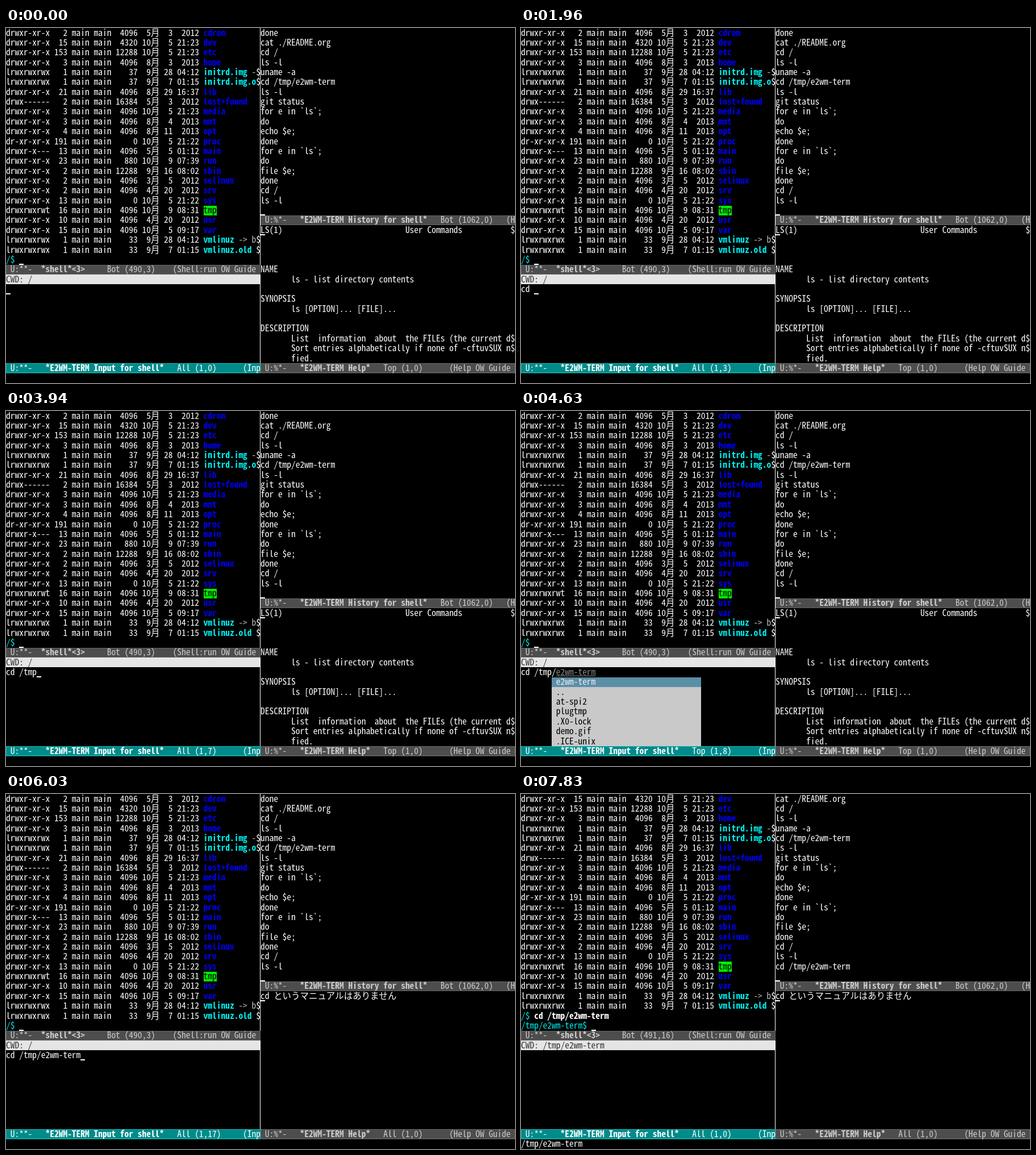
An HTML page with a canvas that plays this animation: 896 by 625 pixels, repeating every 8000 ms.

```html
<!DOCTYPE html>
<html lang="en">
<head>
<meta charset="utf-8">
<title>Shell windows</title>
<style>
html, body { margin: 0; width: 100%; height: 100%; overflow: hidden; background: #000; }
canvas { display: block; }
</style>
</head>
<body>
<canvas id="c" width="896" height="625"></canvas>
<script>
const g = document.getElementById('c').getContext('2d');
const W = 896 / 116, H = 625 / 36, MID = 58;
const FAMILY = '"Noto Sans Mono CJK JP", "Noto Sans Mono", monospace';
const WHITE = '#fff', BLUE = '#00e', CYAN = '#0ee';

// Font size at which one character fills one cell
g.font = '100px ' + FAMILY;
const SIZE = 100 * W / g.measureText('0').width;

const listing = `drwxr-xr-x 2 4096 5 3 2012 cdrom
drwxr-xr-x 15 4320 10 5 21:23 dev
drwxr-xr-x 153 12288 10 5 21:23 etc
drwxr-xr-x 3 4096 8 3 2013 home
lrwxrwxrwx 1 37 9 28 04:12 initrd.img -
lrwxrwxrwx 1 37 9 7 01:15 initrd.img.o
drwxr-xr-x 21 4096 8 29 16:37 lib
drwx------ 2 16384 5 3 2012 lost+found
drwxr-xr-x 3 4096 10 5 21:23 media
drwxr-xr-x 3 4096 8 4 2013 mnt
drwxr-xr-x 4 4096 8 11 2013 opt
dr-xr-xr-x 191 0 10 5 21:22 proc
drwxr-x--- 13 4096 5 5 01:12 main
drwxr-xr-x 23 880 10 9 07:39 run
drwxr-xr-x 2 12288 9 16 08:02 sbin
drwxr-xr-x 2 4096 3 5 2012 selinux
drwxr-xr-x 2 4096 4 20 2012 srv
drwxr-xr-x 13 0 10 5 21:22 sys
drwxrwxrwt 16 4096 10 9 08:31 tmp
drwxr-xr-x 10 4096 4 20 2012 usr
drwxr-xr-x 15 4096 10 5 09:17 var
lrwxrwxrwx 1 33 9 28 04:12 vmlinuz -> b
lrwxrwxrwx 1 33 9 7 01:15 vmlinuz.old`.split('\n').map(line => line.split(' '));

const history = `done
cat ./README.org
cd /
ls -l
uname -a
cd /tmp/e2wm-term
ls -l
git status
for e in \`ls\`;
do
echo $e;
done
for e in \`ls\`;
do
file $e;
done
cd /
ls -l
cd /tmp/e2wm-term`.split('\n');

const manual = `LS(1)                            User Commands           $



NAME
       ls - list directory contents

SYNOPSIS
       ls [OPTION]... [FILE]...

DESCRIPTION
       List  information  about  the FILEs (the current d$
       Sort entries alphabetically if none of -cftuvSUX n$
       fied.`.split('\n');

const menus = {
  cmd: { col: 0, width: 24, pad: 0, bar: true,
    items: ['cd', 'cd-create-profile', 'cd-drive', 'cd-info', 'cd-read', 'cd-paranoia', 'cdrecord'] },
  top: { col: 3, width: 24, pad: 1, bar: true,
    items: ['proc', 'tmp', 'media', '..', 'bin', 'dev', 'etc'] },
  tmp: { col: 7, width: 34, pad: 1, bar: false,
    items: ['e2wm-term', '..', 'at-spi2', 'plugtmp', '.X0-lock', 'demo.gif', '.ICE-unix'] }
};

// Each step changes part of the state at a given time
const steps = [
  [0, { input: '', pos: 'All', menu: null, ghost: '', cursor: true, help: false, echo: '', sent: false, logged: false }],
  [960, { input: 'c' }],
  [1280, { input: 'cd' }],
  [1610, { menu: 'cmd', pos: 'Top' }],
  [1960, { input: 'cd ', menu: null, pos: 'All' }],
  [2260, { input: 'cd /', menu: 'top', pos: 'Top' }],
  [2900, { input: 'cd /t' }],
  [3260, { input: 'cd /tm', menu: null }],
  [3940, { input: 'cd /tmp', pos: 'All' }],
  [4240, { input: 'cd /tmp/', menu: 'tmp', ghost: 'e2wm-term', pos: 'Top' }],
  [4630, { cursor: false }],
  [5700, { cursor: true, help: true }],
  [6030, { input: 'cd /tmp/e2wm-term', menu: null, ghost: '', pos: 'All' }],
  [6220, { cursor: false }],
  [6330, { echo: '/tmp/e2wm-term' }],
  [6660, { input: '', sent: true, cursor: true }],
  [7430, { logged: true }],
  [7830, { cursor: false }]
];

function fill(row, col, cols, rows, color) {
  g.fillStyle = color;
  const x = Math.round(col * W), y = Math.round(row * H);
  g.fillRect(x, y, Math.round((col + cols) * W) - x, Math.round((row + rows) * H) - y);
}

function put(row, col, text, color = WHITE, bold = false) {
  g.fillStyle = color;
  for (const ch of text) {
    const wide = ch > '\u2fff';
    g.font = (bold ? 'bold ' : '') + (wide ? 2 * W : SIZE) + 'px ' + FAMILY;
    g.fillText(ch, col * W, row * H + 13.6);
    col += wide ? 2 : 1;
  }
}

function caret(row, col) {
  g.fillStyle = WHITE;
  g.fillRect(Math.round(col * W), Math.round((row + 1) * H) - 2, 8, 2);
}

function modeLine(row, col, flags, nameCol, name, posCol, pos, modeCol, mode, active) {
  const ink = active ? WHITE : '#ccc';
  fill(row, col, MID, 1, active ? '#008b8b' : '#4d4d4d');
  g.strokeStyle = active ? '#20b2aa' : '#666';
  g.lineWidth = 1;
  g.strokeRect(col * W + .5, Math.round(row * H) + .5, 447, 16);
  put(row, col + 1, flags, ink);
  put(row, col + nameCol, name, ink, true);
  put(row, col + posCol, pos, ink);
  put(row, col + modeCol, mode, ink);
}

function listRow(row, [perm, links, size, month, day, time, name, ...rest]) {
  put(row, 0, `${perm} ${links.padStart(3)} main main ${size.padStart(5)} ${month.padStart(2)}月 ${day.padStart(2)} ${time.padStart(5)}`);
  const link = perm[0] === 'l';
  if (name === 'tmp') {
    fill(row, 45, 3, 1, '#00ee00');
    put(row, 45, name, '#000');
  } else put(row, 45, name, link ? CYAN : BLUE, true);
  if (link) {
    put(row, 46 + name.length, rest.join(' '), '#bbb');
    put(row, 57, '$');
  }
}

function drawShell(s) {
  const shift = s.sent ? 1 : 0;
  listing.slice(shift).forEach((item, i) => listRow(i, item));
  if (s.sent) {
    put(22, 0, '/$', CYAN);
    put(22, 3, 'cd /tmp/e2wm-term', WHITE, true);
  }
  const prompt = s.sent ? '/tmp/e2wm-term$' : '/$';
  put(23, 0, prompt, CYAN);
  caret(23, prompt.length + 1);
  modeLine(24, 0, 'U:**-', 8, '*shell*<3>', 23, s.sent ? 'Bot (491,16)' : 'Bot (490,3)', 38, '(Shell:run OW Guide');
}

function drawMenu({ col, width, pad, bar, items }) {
  const blue = '#5b8fa8';
  fill(27, col, width, 7, '#c9c9c9');
  fill(27, col, width, 1, blue);
  if (bar) fill(27, col + width - 1, 1, 7, blue);
  items.forEach((item, i) => put(27 + i, col + pad, item, i ? '#000' : '#eee'));
}

function drawInput(s) {
  const end = s.input.length;
  fill(25, 0, MID, 1, '#e5e5e5');
  put(25, 0, 'CWD: /' + (s.logged ? 'tmp/e2wm-term' : ''), '#333');
  put(26, 0, s.input);
  if (s.ghost) {
    put(26, end, s.ghost, '#888');
    g.fillRect(end * W, 466, s.ghost.length * W, 1);
  }
  if (s.cursor) caret(26, end);
  if (s.menu) drawMenu(menus[s.menu]);
  modeLine(34, 0, 'U:**-', 9, '*E2WM-TERM Input for shell*', 39, `${s.pos} (1,${end})`, 54, '(Inp', true);
  put(35, 0, s.echo);
}

function drawRight(s) {
  const first = s.logged ? 1 : 0;
  history.slice(first, first + 18).forEach((line, i) => put(i, MID, line));
  caret(18, MID);
  modeLine(19, MID, 'U:%*-', 9, '*E2WM-TERM History for shell*', 41, 'Bot (1062,0)', 56, '(H');
  const page = s.help ? ['cd というマニュアルはありません'] : manual;
  page.forEach((line, i) => put(20 + i, MID, line));
  caret(20, MID);
  modeLine(34, MID, 'U:%*-', 9, '*E2WM-TERM Help*', 28, s.help ? 'All (1,0)' : 'Top (1,0)', 43, '(Help OW Guide');
}

function frame(now) {
  const t = now % 8000;
  const s = Object.assign({}, ...steps.filter(([at]) => at <= t).map(([, change]) => change));
  g.fillStyle = '#000';
  g.fillRect(0, 0, 896, 625);
  drawShell(s);
  drawInput(s);
  drawRight(s);
  g.fillStyle = WHITE;
  g.fillRect(447, 0, 1, 417);
  g.fillRect(447, 434, 1, 156);
  requestAnimationFrame(frame);
}
requestAnimationFrame(frame);
</script>
</body>
</html>
```
